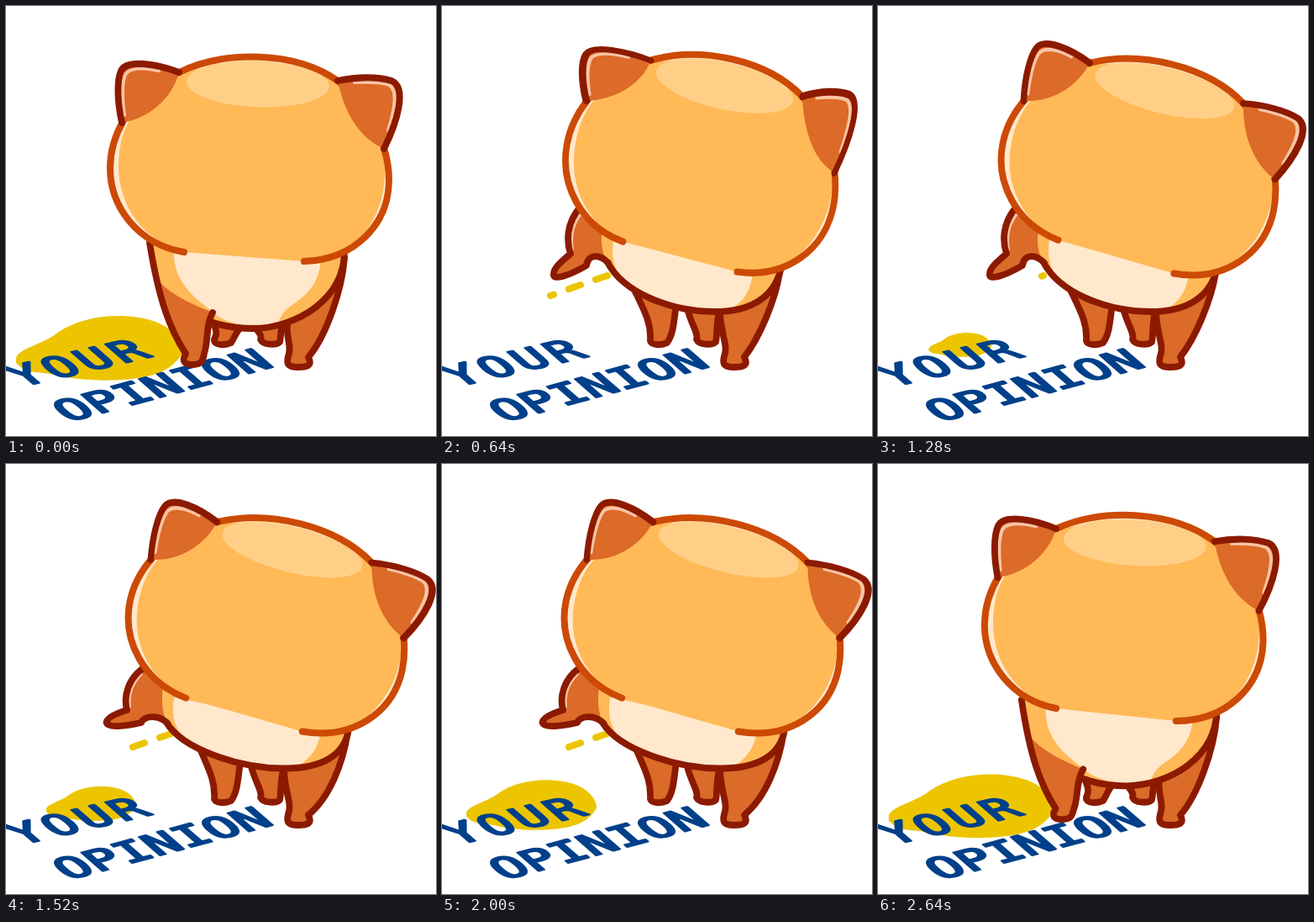
Recreate the animation shown at these times as an HTML page. Size 512 px wide and 512 px high, loop 2720 ms.

```html
<!DOCTYPE html>
<html lang="en">
<head>
<meta charset="utf-8">
<title>Your opinion</title>
<style>
  html, body { margin: 0; width: 100%; height: 100%; overflow: hidden; background: #fff; }
  svg { display: block; width: 100vw; height: 100vh; }
  path { fill: none; stroke-linecap: round; stroke-linejoin: round; }
  .fur { fill: #ffb957; }
  .cream { fill: #ffe8cc; }
  .dark { fill: #dc6a28; }
  .line { stroke: #8b1a00; stroke-width: 7.8; }
  .rim { stroke: #cc4a05; stroke-width: 8; }
  .shine { stroke: #f8c4a4; stroke-width: 4; }
  .stream { stroke: #ecc500; stroke-width: 8; }
  .puddle { fill: #ecc500; }
  text { font: 50px "DejaVu Sans Mono", monospace; fill: #00408a; stroke: #00408a; stroke-width: 3; stroke-linejoin: round; }
  .wide { letter-spacing: 4.6px; }
</style>
</head>
<body>
<svg viewBox="0 0 512 512">
  <path id="puddle" class="puddle" d="M12 419 C15 408 45 402 60 390 C90 368 140 364 175 375 C200 383 211 400 211 412 C200 430 185 440 150 444 C120 447 90 446 62 440 C40 434 26 440 12 425 Z"/>
  <text class="wide" transform="matrix(1.165 -.27 .69 .6 18.5 453.5)">YOUR</text>
  <text transform="matrix(1.17 -.316 .69 .6 74.5 495.6)">OPINION</text>
  <g id="stream"></g>
  <g id="body"></g>
  <g id="head">
    <path class="cream" d="M212 293 C158 284 124 240 124 193 C124 172 130 154 139 138 C155 110 176 90 206 79 C262 52 345 54 395 89 C425 112 444 140 450 169 C454 182 456 195 456 207 C456 260 415 302 355 304 Z"/>
    <path class="fur" d="M212 293 C165 280 134 240 134 190 C134 170 138 152 146 138 C160 110 176 95 206 82 C262 62 345 62 395 92 C425 112 440 140 448 169 C460 220 438 288 375 302 L355 304 Z"/>
    <ellipse cx="300" cy="93" rx="85" ry="27.5" fill="#ffcf87" transform="rotate(2 300 93)"/>
    <path class="rim" d="M212 293 C158 284 124 240 124 193 C124 172 130 154 139 138 C155 110 176 90 206 79 C262 52 345 54 395 89 C425 112 444 140 450 169 C454 182 456 195 456 207 C456 260 415 302 355 304"/>
    <g id="earL">
      <path class="dark" d="M138 139 C132 112 132 88 137 77 C144 63 180 69 206 79 C198 110 170 134 138 139"/>
      <path class="shine" d="M141 130 C138 108 138 92 142 82 C147 73 165 73 182 77"/>
      <path class="line" d="M138 139 C132 112 132 88 137 77 C144 63 180 69 206 79"/>
    </g>
    <g id="earR">
      <path class="dark" d="M395 89 C418 84 443 84 459 89 C478 97 466 138 450 170 C420 157 402 125 395 89"/>
      <path class="shine" d="M415 91 C435 90 448 91 456 94 C468 101 462 126 455 148"/>
      <path class="line" d="M395 89 C418 84 443 84 459 89 C478 97 466 138 450 170"/>
    </g>
  </g>
</svg>
<script>
const LOOP = 2720, STEP = 80;
const $ = id => document.getElementById(id);
const add = (parent, cls) => {
  const p = document.createElementNS('http://www.w3.org/2000/svg', 'path');
  p.setAttribute('class', cls);
  return parent.appendChild(p);
};

// Each part has three poses: standing, leg lifted, leg raised high
const paw = 'C247 405 262 404 268 401 ', midPaw = 'C306 404 322 404 326 400 ';
const hindPaw = 'C366 430 355 430 348 430 C334 430 334 425 336 417 C341 405 333 395 ';
const torso = [
  'C265 383 280 384 295 384 C345 383 404 350 403 290',
  'C215 340 270 364 325 364 C370 364 395 345 403 315',
  'C205 340 288 361 338 361 C385 361 413 347 413 315'];
const leg = [
  'C182 350 195 385 214 414 C208 424 214 427 222 427 C236 427 234 420 237 410 C241 395 238 380 246 365',
  'C148 258 148 280 153 295 C140 306 133 312 133 319 C131 327 150 322 172 309 C174 295 188 295 198 306',
  'C140 252 132 275 135 291 C122 288 107 292 106 297 C112 303 135 302 150 307 C155 305 175 300 187 312'];
const hind = [
  'M403 300 C400 340 380 395 360 418 ' + hindPaw + '335 378',
  'M402 318 C397 350 378 395 360 418 ' + hindPaw + '331 366',
  'M412 320 C405 365 392 400 360 418 ' + hindPaw + '331 366'];
const join = (heads, mids, tails = []) => heads.map((h, i) => h + mids[i] + (tails[i] || ''));

const parts = [
  ['dark line', [
    'M248 380 C252 390 250 392 248 397 ' + paw + 'C272 395 274 388 280 382',
    'M230 340 C242 365 249 378 248 397 ' + paw + 'C276 390 276 375 279 355',
    'M234 343 C242 365 249 378 248 397 ' + paw + 'C276 390 276 375 279 355']],
  ['dark line', [
    'M296 382 C302 390 305 393 303 397 ' + midPaw + 'C328 392 326 386 330 380',
    'M292 360 C296 378 306 390 303 397 ' + midPaw + 'C328 392 326 380 330 365',
    'M292 360 C296 378 306 390 303 397 ' + midPaw + 'C328 392 326 380 330 365']],
  ['dark line', hind],
  ['fur', join([
    'M172 275 C168 300 175 350 247 377 ',
    'M185 250 C180 275 186 300 197 305 ',
    'M180 255 C178 280 180 300 185 310 '], torso)],
  ['cream', [
    'M200 290 C198 325 220 345 246 364 C262 381 300 384 325 378 C328 350 372 355 375 300 Z',
    'M205 275 C200 295 205 315 215 325 C255 355 300 362 345 360 C362 350 368 335 371 315 Z',
    'M196 280 C193 295 195 312 207 325 C245 350 300 360 350 359 C365 352 378 335 380 318 Z']],
  ['line', join(['M247 377 ', 'M197 305 ', 'M185 310 '], torso)],
  ['dark', join(['M177 322 ', 'M165 239 ', 'M168 243 '], leg, [
    ' C225 356 195 345 177 322',
    ' C190 295 188 280 192 260',
    ' C182 300 180 280 184 262'])],
  ['shine', [
    'M182 335 C185 345 190 360 195 370',
    'M164 249 C154 262 153 278 155 290',
    'M157 252 C144 262 138 274 139 287']],
  ['line', join(['M171 282 ', 'M165 239 ', 'M168 243 '], leg)]
].map(([cls, poses]) => ({
  el: add($('body'), cls), poses,
  nums: poses.map(d => d.match(/-?[\d.]+/g).map(Number))
}));
const legShine = parts[7].el;

const pose = (part, lift, high) => {
  const [a, b, c] = part.nums;
  let i = 0;
  part.el.setAttribute('d', part.poses[0].replace(/-?[\d.]+/g, () => {
    const v = a[i] + lift * (b[i] - a[i] + high * (c[i] - b[i]));
    i++;
    return v.toFixed(2);
  }));
};

// Linear interpolation through [time, value] pairs
const at = (keys, t) => {
  if (t <= keys[0][0]) return keys[0][1];
  for (let i = 1; i < keys.length; i++) {
    const [t0, v0] = keys[i - 1], [t1, v1] = keys[i];
    if (t <= t1) return v0 + (v1 - v0) * (t - t0) / (t1 - t0);
  }
  return keys[keys.length - 1][1];
};

const liftKeys = [[480, 0], [560, .06], [640, 1], [2400, 1], [2480, .8], [2560, .3], [2640, .03], [2720, 0]];
const tiltKeys = [[0, 0], [80, -.9], [320, -1.6], [480, 0], [560, 2], [640, 10.2], [720, 13], [960, 12],
  [1280, 11.7], [2320, 11.7], [2400, 12.5], [2480, 10], [2560, 4.5], [2640, 1.6], [2720, 0]];
const stretchKeys = [[560, 1], [640, 1.02], [800, 1.01], [1040, 1]];
const earKeys = [[560, 0], [640, 15], [720, -5], [2400, -5], [2640, 0]];
const poolKeys = [[880, 0], [1120, .235], [1280, .375], [1680, .645], [2240, .88], [2320, .905], [2640, .99], [2720, 1]];
const frontKeys = [[0, 5], [80, 5], [320, 71], [400, 46], [480, 5]];
const tailKeys = [[320, 0], [400, 10], [480, 0]];

const dashes = [0, 1, 2].map(() => add($('stream'), 'stream'));
const jet = x => `${(197 - x).toFixed(1)} ${(321 + x * .34 + x * x * .0002).toFixed(1)}`;

function drawStream(t) {
  const on = t >= 640 && t < 2480, phase = (t + 160) % 480;
  const front = at(frontKeys, phase) - 3, tail = at(tailKeys, phase);
  dashes.forEach((el, i) => {
    const a = Math.max(tail, i * 32), b = Math.min(front, i * 32 + 14);
    el.setAttribute('d', on && b > a ? `M${jet(a)} L${jet(b)}` : '');
  });
}

// Shears an ear along its base line, which starts at x, y
const bend = (id, x, y, angle, skew) => $(id).setAttribute('transform',
  `translate(${x} ${y}) rotate(${angle}) skewX(${skew}) rotate(${-angle}) translate(${-x} ${-y})`);

function draw(t) {
  const sway = (1 - Math.cos(2 * Math.PI * (t - 1280) / 960)) / 2;
  const high = sway * at([[640, 0], [880, 1]], t);
  const lift = at(liftKeys, t);
  parts.forEach(p => pose(p, lift, high));
  legShine.style.opacity = lift;

  const stretch = at(stretchKeys, t) - .012 * high * lift;
  $('head').setAttribute('transform',
    `translate(283 298.5) rotate(${at(tiltKeys, t)}) scale(${2 - stretch} ${stretch}) translate(-283 -298.5)`);
  const skew = at(earKeys, t) - 4 * high * lift;
  bend('earL', 138, 139, -41.4, skew);
  bend('earR', 395, 89, 55.5, skew);

  const size = t < 400 ? 1 : at(poolKeys, t);
  $('puddle').setAttribute('transform', `translate(89.4 401) scale(${size}) translate(-89.4 -401)`);
  $('puddle').style.opacity = t < 400 ? at([[0, 1], [320, 0]], t) : 1;
  drawStream(t);
}

const start = performance.now();
function tick(now) {
  const t = Math.max(0, now - start) % LOOP;
  draw(Math.floor(t / STEP) * STEP);
  requestAnimationFrame(tick);
}
draw(0);
requestAnimationFrame(tick);
</script>
</body>
</html>
```
